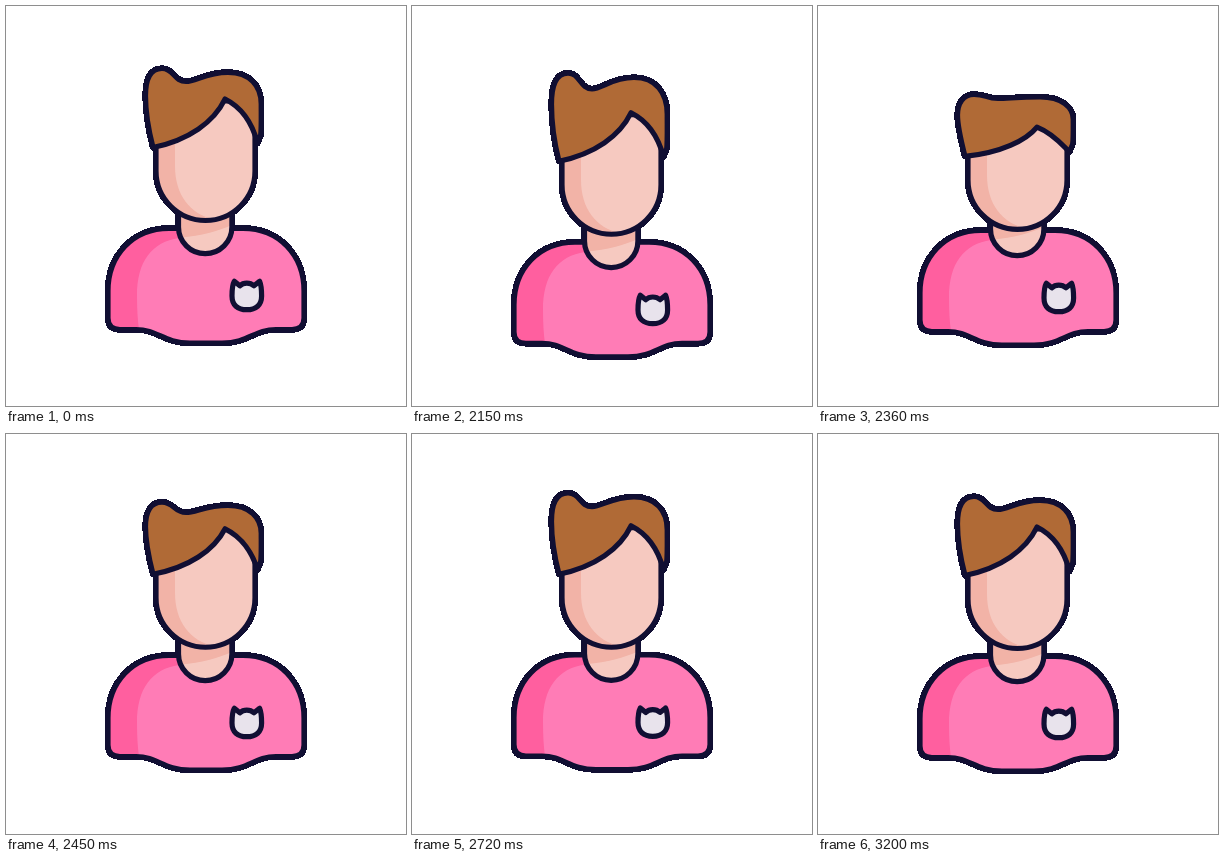
Write an HTML page that moves like this. It is 400 by 400 pixels and loops after 3830 ms.

```html
<!DOCTYPE html>
<html lang="en">
<head>
<meta charset="utf-8">
<title>Bouncing avatar</title>
<style>
  html, body { margin: 0; width: 100%; height: 100%; overflow: hidden; background: #fff; }
  svg { display: block; width: 100vw; height: 100vh; }
  .line, .rim { fill: none; stroke: #110f33; stroke-linecap: round; stroke-linejoin: round; }
  .line { stroke-width: 5.2; }
  .rim { stroke-width: 6.4; shape-rendering: crispEdges; }
  .skin { fill: #f6c9c0; }
  .skin-shade { fill: #f2b3a7; }
  .shirt { fill: #ff7cb6; }
  .shirt-shade { fill: #ff5f9f; }
  .badge { fill: #e8e3ec; }
  .hair { fill: #b06a36; }
</style>
</head>
<body>
<svg viewBox="0 0 400 400">
  <defs>
    <path id="torso" d="M163 222.3C127 222.3 102 249 102 285V312Q102 323.5 114 323.5H130C152 323.5 157 337 184 337H216C243 337 248 323.5 270 323.5H286Q298 323.5 298 312V285C298 249 273 222.3 237 222.3Z"/>
    <path id="neck" d="M172.5 195V221a26.7 26.7 0 0 0 53.4 0V195"/>
    <path id="face" d="M150 95H249V165a49.5 49.5 0 0 1-99 0Z"/>
    <path id="hair"/>
  </defs>

  <!-- hard outer edge behind everything -->
  <g class="body">
    <use href="#torso" class="rim"/>
    <use href="#neck" class="rim"/>
  </g>
  <g class="head">
    <use href="#face" class="rim"/>
    <use href="#hair" class="rim"/>
  </g>

  <g class="body">
    <use href="#torso" class="shirt"/>
    <path class="shirt-shade" d="M163 222.3C127 222.3 102 249 102 285V312Q102 323.5 114 323.5H133Q131 310 131 290C131 255 146 236 173 232V222.3Z"/>
    <use href="#torso" class="line"/>
    <use href="#neck" class="skin"/>
    <path class="skin-shade" d="M172.5 195H226V219C212 225 195 230 175 231.5L172.5 221Z"/>
    <use href="#neck" class="line"/>
    <path class="line badge" d="M228.3 275.3C226.3 279 226 284 226 290C226 299 231.5 303.7 240.8 303.7C250 303.7 255.6 299 255.6 290C255.6 284 255.2 279 253.6 275.3L248 279.8C244 276.2 237.5 276.2 233.8 279.8Z"/>
  </g>
  <g class="head">
    <use href="#face" class="skin"/>
    <path class="skin-shade" d="M150 95H169V160C169 189 184 208 208 213.5A49.5 49.5 0 0 1 150 165Z"/>
    <use href="#face" class="line"/>
    <use href="#hair" class="line hair"/>
  </g>
</svg>
<script>
  const LOOP = 3830, REST = 2000, STEP = 30, BOUNCE = 1200;

  // Half-sine swings: each height is reached midway between two rest crossings.
  function swing(t, crossings, heights) {
    const i = crossings.findIndex(c => c > t) - 1;
    if (i < 0) return 0;
    const [a, b] = crossings.slice(i, i + 2);
    return heights[i] * Math.sin(Math.PI * (t - a) / (b - a));
  }

  const bodyY = t => swing(t, [20, 375, 830], [15.2, -2]);
  const headY = t => swing(t, [30, 430, 740, 1120], [17, -6.1, 4.5]);
  const crownY = t => swing(t, [30, 250, 480, 740, 1100], [-9.3, 17, -9.7, 3.3]);

  // c moves the crown; the fringe only gives way when the hair is squashed.
  function hairPath(c) {
    const n = Math.max(0, c) ** 2 / 15, v = c * .7 - n * .2, r = c * .93;
    return `M147 141.5C142 122 139.5 107 139.5 ${90 + c * .6}
      C139.5 ${72 + c} 145 ${62.5 + c} 156 ${62.5 + c}
      C168 ${62.5 + c} 168 ${75.5 + v} 180 ${75.5 + v}
      C190 ${75.5 + v} 200 ${66.3 + r} 222 ${66.3 + r}
      C244 ${66.3 + r} 255.2 ${80 + r * .8} 255.2 ${98 + r * .4}
      C255.2 110 255.5 122 254.7 129L251.5 137
      C247 ${120 + n * .7} 237 ${102 + n * .9} 219 ${93 + n}
      C208 ${116 + n * .5} 183 ${134 + n * .2} 147 141.5Z`;
  }

  const hair = document.getElementById('hair');

  function shift(selector, y) {
    for (const el of document.querySelectorAll(selector)) {
      el.setAttribute('transform', `translate(0 ${y.toFixed(2)})`);
    }
  }

  function draw(now) {
    const elapsed = Math.floor((now % LOOP - REST) / STEP) * STEP;
    const t = Math.max(0, Math.min(BOUNCE, elapsed));
    shift('.body', bodyY(t));
    shift('.head', headY(t));
    hair.setAttribute('d', hairPath(crownY(t)));
  }

  const begin = performance.now();
  function tick() {
    draw(performance.now() - begin);
    requestAnimationFrame(tick);
  }
  tick();
</script>
</body>
</html>
```
